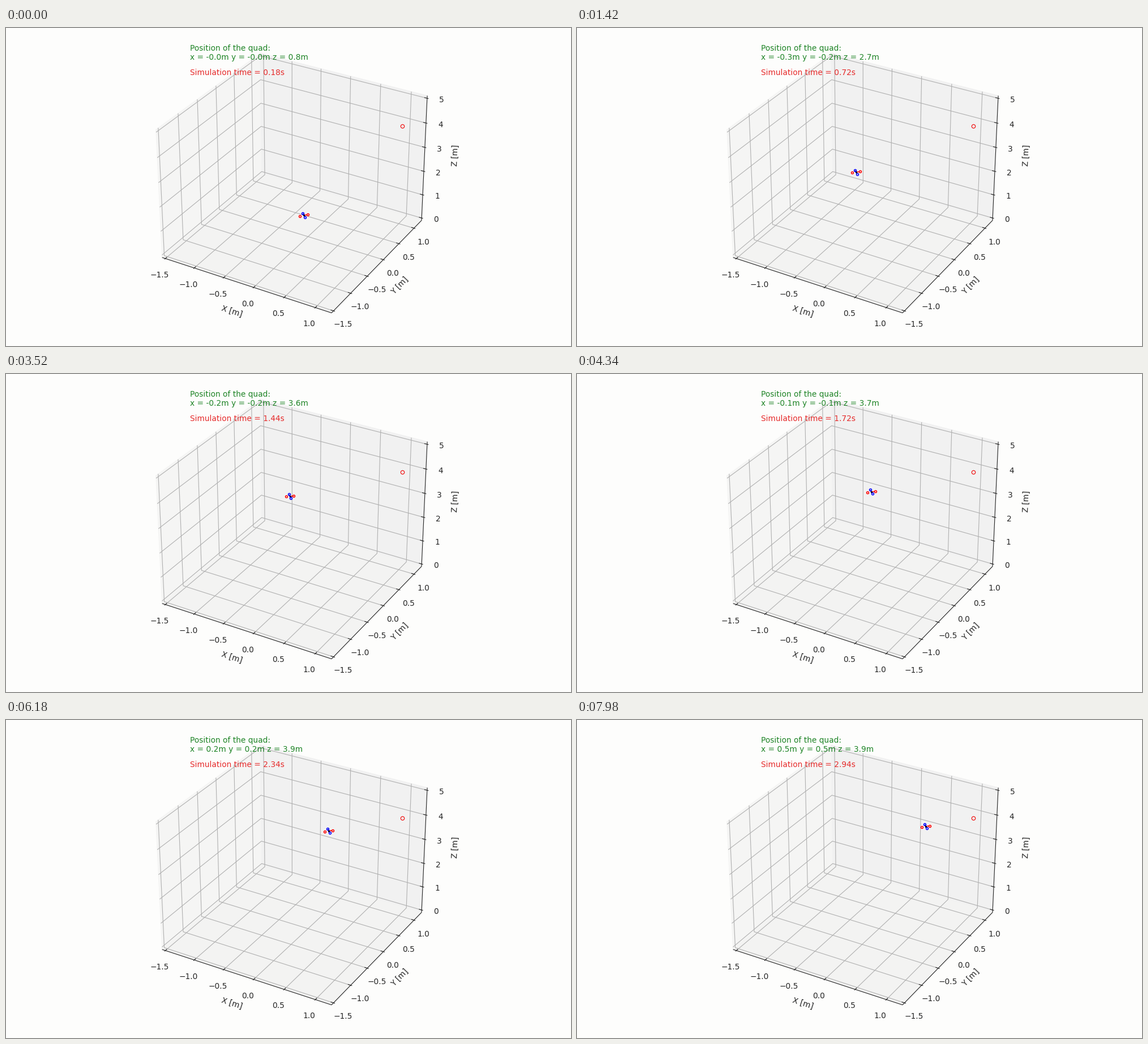
Animation, 998 px wide and 561 px high, one loop 8 s. Source, as a matplotlib script:

```python
import numpy as np
import matplotlib.pyplot as plt
from matplotlib.animation import FuncAnimation
from matplotlib.collections import LineCollection

W, H, DPI = 998, 561, 100
LOOP, INTERVAL = 8000, 40
TEXT_SIZE, INK = 9.91, "#242424"
plt.rcParams["font.family"] = "DejaVu Sans"

# Perspective camera: elevation 30, azimuth -60, distance 10
SCALE, CENTER_X, CENTER_Y, DIST = 2880, 509.1, 262.6, 10
EL, AZ = np.radians(30), np.radians(-60)
VIEW = np.array([np.cos(EL) * np.cos(AZ), np.cos(EL) * np.sin(AZ), np.sin(EL)])
RIGHT = np.array([-np.sin(AZ), np.cos(AZ), 0])
UP = np.cross(VIEW, RIGHT)

# Data limits, and the slightly wider box that carries the panes
LOW, HIGH = np.array([-1.5, -1.5, 0]), np.array([1.2, 1.2, 5])
SPAN = HIGH - LOW
BOX = np.array([8, 8, 6]) / 7
X0, Y0, Z0 = LOW - SPAN / 48
X1, Y1, Z1 = HIGH + SPAN / 48


def project(x, y, z):
    p = ((np.array([x, y, z]) - LOW) / SPAN - 0.5) * BOX
    depth = DIST - VIEW @ p
    return np.array([CENTER_X + SCALE * (RIGHT @ p) / depth,
                     CENTER_Y - SCALE * (UP @ p) / depth])


def path(*points):
    return [project(*p) for p in points]


fig = plt.figure(figsize=((W + 0.001) / DPI, (H + 0.001) / DPI), dpi=DPI,
                 facecolor="#fdfdfc")
ax = fig.add_axes([0, 0, 1, 1])
ax.set_xlim(0, W)
ax.set_ylim(H, 0)
ax.axis("off")

panes = [
    ("#f5f5f4", [(X0, Y0, Z0), (X0, Y1, Z0), (X0, Y1, Z1), (X0, Y0, Z1)]),
    ("#f1f1f1", [(X0, Y1, Z0), (X1, Y1, Z0), (X1, Y1, Z1), (X0, Y1, Z1)]),
    ("#f3f3f2", [(X0, Y0, Z0), (X1, Y0, Z0), (X1, Y1, Z0), (X0, Y1, Z0)]),
]
for color, corners in panes:
    ax.add_patch(plt.Polygon(path(*corners), fc=color, ec=color, lw=1, zorder=1))

grid, dark = [], [
    path((X0, Y0, Z0), (X1, Y0, Z0)),
    path((X1, Y0, Z0), (X1, Y1, Z0)),
    path((X1, Y1, Z0), (X1, Y1, Z1)),
]
TICK_IN, TICK_OUT = 0.045, 0.0225


def label(text, pos, dx, dy):
    ax.text(pos[0] + dx, pos[1] + dy + 5, text, size=TEXT_SIZE, color=INK,
            ha="center", va="baseline", zorder=4)


for v in np.arange(-1.5, 1.01, 0.5):
    text = f"{v:.1f}".replace("-", "\u2212")
    grid.append(path((v, Y0, Z0), (v, Y1, Z0), (v, Y1, Z1)))
    grid.append(path((X1, v, Z0), (X0, v, Z0), (X0, v, Z1)))
    dark.append(path((v, Y0 + TICK_IN, Z0), (v, Y0 - TICK_OUT, Z0)))
    dark.append(path((X1 - TICK_IN, v, Z0), (X1 + TICK_OUT, v, Z0)))
    label(text, project(v, Y0, Z0), -10.6, 28.2)
    label(text, project(X1, v, Z0), 16.6, 23.4)
for v in range(6):
    grid.append(path((X0, Y0, v), (X0, Y1, v), (X1, Y1, v)))
    dark.append(path((X1 - TICK_IN, Y1, v), (X1 + TICK_OUT, Y1, v)))
    label(str(v), project(X1, Y1, v), 25.4, 2)

ax.add_collection(LineCollection(grid, colors="#b0b0b0", linewidths=0.8, zorder=2))
ax.add_collection(LineCollection(dark, colors=INK, linewidths=0.8, zorder=3))

for text, x, y, angle in [("X [m]", 399, 500, -18), ("Y [m]", 695, 454, 46),
                          ("Z [m]", 794, 224.5, 87.5)]:
    ax.text(x, y, text, size=TEXT_SIZE, color=INK, rotation=angle,
            ha="center", va="center", zorder=4)

GREEN, RED = "#1e8426", "#e62b2b"


def caption(y, color, text=""):
    return ax.text(324.7, y, text, size=TEXT_SIZE, color=color, va="baseline", zorder=6)


caption(40.2, GREEN, "Position of the quad:")
position_text = caption(56, GREEN)
time_text = caption(82.8, RED)


def ring(color, size, width):
    return ax.plot([], [], "o", mfc="none", mec=color, ms=size, mew=width, zorder=5)[0]


ring("#f01818", 4.6, 0.9).set_data(*[[c] for c in project(1, 1, 4)])
red_arm, = ax.plot([], [], color="red", lw=1.1, zorder=5)
blue_arm, = ax.plot([], [], color="#000080", lw=1.4, zorder=5)
hub, = ax.plot([], [], "o", color="black", ms=2.4, mew=0, zorder=5)
red_rotors = ring("red", 2.8, 1.1)
blue_rotors = ring("blue", 2.8, 1.1)

# Flight: playback clock to simulation time, then smooth curves through waypoints
CLOCK = [0, 1420, 2360, 3520, 5060, 6180, 7980]
SIM = np.array([0.18, 0.72, 1.02, 1.44, 1.98, 2.34, 2.94])
DIAGONAL = np.array([-0.043, -0.245, -0.274, -0.193, 0.040, 0.217, 0.493])
HEIGHT = np.array([0.82, 2.73, 3.215, 3.596, 3.787, 3.855, 3.90])
TILT = [1.5, 1.0, 0.3, 0.6, 0.9, 1.0, 1.0]


def hermite(t, values):
    slopes = np.gradient(values, SIM, edge_order=2)
    i = min(max(np.searchsorted(SIM, t, side="right") - 1, 0), len(SIM) - 2)
    h = SIM[i + 1] - SIM[i]
    s = (t - SIM[i]) / h
    return ((1 + 2 * s) * (1 - s) ** 2 * values[i] + s * (1 - s) ** 2 * h * slopes[i]
            + s * s * (3 - 2 * s) * values[i + 1] + s * s * (s - 1) * h * slopes[i + 1])


def draw(frame):
    clock = frame * INTERVAL + INTERVAL / 2
    sim = np.floor(np.interp(clock, CLOCK, SIM) / 0.02 + 1e-6) * 0.02
    s, z = hermite(sim, DIAGONAL), hermite(sim, HEIGHT)
    x, y = s - 0.006, s + 0.006
    cx, cy = project(x, y, z)
    tilt = np.interp(sim, SIM, TILT)

    red_rotors.set_data([cx - 6.9, cx + 6.9], [cy + tilt, cy - tilt])
    blue_rotors.set_data([cx - 1.9, cx + 1.9], [cy - 3.5, cy + 3.5])
    red_arm.set_data([cx, cx + 5], [cy, cy - tilt * 0.7])
    blue_arm.set_data([cx - 1.2, cx + 1.2], [cy - 2, cy + 2])
    hub.set_data([cx], [cy])
    position_text.set_text(f"x = {x:.1f}m y = {y:.1f}m z = {z:.1f}m")
    time_text.set_text(f"Simulation time = {sim:.2f}s")
    return red_rotors, blue_rotors, red_arm, blue_arm, hub, position_text, time_text


anim = FuncAnimation(fig, draw, frames=LOOP // INTERVAL, interval=INTERVAL,
                     repeat=True, repeat_delay=0)
plt.show()
```
